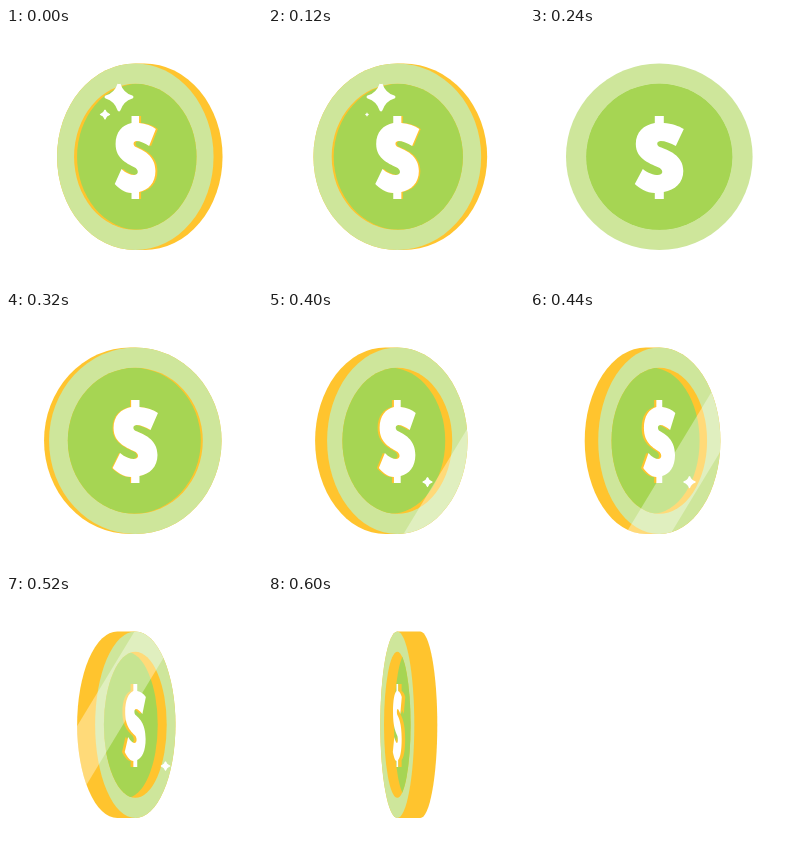
Animation, 256 px wide and 256 px high, one loop 0.64 s. Source, as an HTML page with a canvas:

```html
<!DOCTYPE html>
<html lang="en">
<head>
<meta charset="utf-8">
<title>Spinning coin</title>
<style>
html, body { margin: 0; width: 100%; height: 100%; overflow: hidden; background: #fff; }
canvas { display: block; width: 256px; height: 256px; }
</style>
</head>
<body>
<canvas id="stage" width="256" height="256"></canvas>
<script>
const ctx = document.getElementById('stage').getContext('2d');
const LOOP = 640, STEP = 40, HOLD = 120;
const CX = 129.3, CY = 128.8, R = 93.3, INNER = 73;
const GOLD = '#ffc42e', RING = '#cee69b', GREEN = '#a6d553';

// time, angle in degrees, rim depth, recess depth, symbol depth
const poses = [
  [120, -26, 6, 2, 1.5],
  [240, 0, 0, 0, 0],
  [320, 22.4, -5, -2, -1],
  [400, 41.2, -12, -7, -2],
  [480, 57, -15, -8, -2.5],
  [560, 72, -21, -10, -3]
];
const rest = [0, -33, 9, 3, 2];
const flipped = [600, -79.5, 23, 10, 3.5];

const bigSparkle = [[0, 14], [120, 14], [240, 0]];
const smallSparkle = [[0, 5], [120, 2], [160, 0]];
const lowSparkle = [[320, 0], [400, 5], [480, 7], [600, 0]];

const dollar = new Path2D(
  'M125 88H134V95C142 95.5 149 98 154 101L146 118C141 115 135 113 131 113' +
  'C127 113 126 117 130 119C138 122 153.500 127 153.500 143C153.500 155 145 162 134 164' +
  'V171H125V165C117 165 109 160 105 156L113 141C118 145 124 147 128 147' +
  'C133 147 134 143 130 140C122 136 106 132 106 116C106 104 114 97 125 95Z');

function lerpRows(rows, t) {
  if (t <= rows[0][0]) return rows[0];
  for (let i = 1; i < rows.length; i++) {
    const a = rows[i - 1], b = rows[i];
    if (t <= b[0]) {
      const k = (t - a[0]) / (b[0] - a[0]);
      return a.map((v, j) => v + (b[j] - v) * k);
    }
  }
  return rows[rows.length - 1];
}

function poseAt(t) {
  if (t < HOLD) return rest;
  return t >= 600 ? flipped : lerpRows(poses, t);
}

function disc(x, rx, ry) {
  const p = new Path2D();
  p.ellipse(x, CY, rx, ry, 0, 0, Math.PI * 2);
  return p;
}

function fill(path, color) {
  ctx.fillStyle = color;
  ctx.fill(path);
}

function symbol(dx, squash, color) {
  ctx.save();
  ctx.translate(CX + dx, 0);
  ctx.scale(squash, 1);
  ctx.translate(-129.5, 0);
  fill(dollar, color);
  ctx.restore();
}

function sparkle(x, y, r) {
  if (r <= 0) return;
  const c = r * 0.22, tip = r * 0.92;
  ctx.beginPath();
  ctx.moveTo(x, y - tip);
  ctx.quadraticCurveTo(x + c, y - c, x + tip, y);
  ctx.quadraticCurveTo(x + c, y + c, x, y + tip);
  ctx.quadraticCurveTo(x - c, y + c, x - tip, y);
  ctx.quadraticCurveTo(x - c, y - c, x, y - tip);
  ctx.fillStyle = ctx.strokeStyle = '#fff';
  ctx.lineJoin = 'round';
  ctx.lineWidth = r * 0.22;
  ctx.fill();
  ctx.stroke();
}

// Slanted band of light sweeping from right to left
function sheen(t, body) {
  const x = 670 - t, width = 45, lean = 256 / 1.65;
  ctx.save();
  ctx.clip(body);
  ctx.beginPath();
  ctx.moveTo(x, 0);
  ctx.lineTo(x + width, 0);
  ctx.lineTo(x + width - lean, 256);
  ctx.lineTo(x - lean, 256);
  ctx.fillStyle = 'rgba(255,255,255,.36)';
  ctx.fill();
  ctx.restore();
}

function draw(t) {
  const [, angle, rim, recess, lift] = poseAt(t);
  const squash = Math.cos(angle * Math.PI / 180);
  const face = disc(CX, R * squash, R);
  const well = disc(CX, INNER * squash, INNER);
  const body = new Path2D();
  body.ellipse(CX + Math.min(rim, 0), CY, R * squash, R, 0, Math.PI / 2, Math.PI * 1.5);
  body.ellipse(CX + Math.max(rim, 0), CY, R * squash, R, 0, -Math.PI / 2, Math.PI / 2);
  body.closePath();

  ctx.fillStyle = '#fff';
  ctx.fillRect(0, 0, 256, 256);
  if (rim) fill(body, GOLD);
  fill(face, RING);
  fill(well, recess ? GOLD : GREEN);
  ctx.save();
  ctx.clip(well);
  fill(disc(CX + recess, INNER * squash, INNER), GREEN);
  ctx.restore();

  if (lift) {
    symbol(lift, squash, GOLD);
    symbol(lift / 2, squash, GOLD);
  }
  symbol(0, squash, '#fff');
  sheen(t, body);

  sparkle(113, 69, lerpRows(bigSparkle, t)[1]);
  sparkle(99, 86.500, lerpRows(smallSparkle, t)[1]);
  sparkle(159.5, 170, lerpRows(lowSparkle, t)[1]);
}

const start = performance.now();
function tick() {
  const t = (performance.now() - start) % LOOP;
  draw(t < HOLD ? 0 : Math.floor(t / STEP) * STEP);
  requestAnimationFrame(tick);
}
tick();
</script>
</body>
</html>
```
